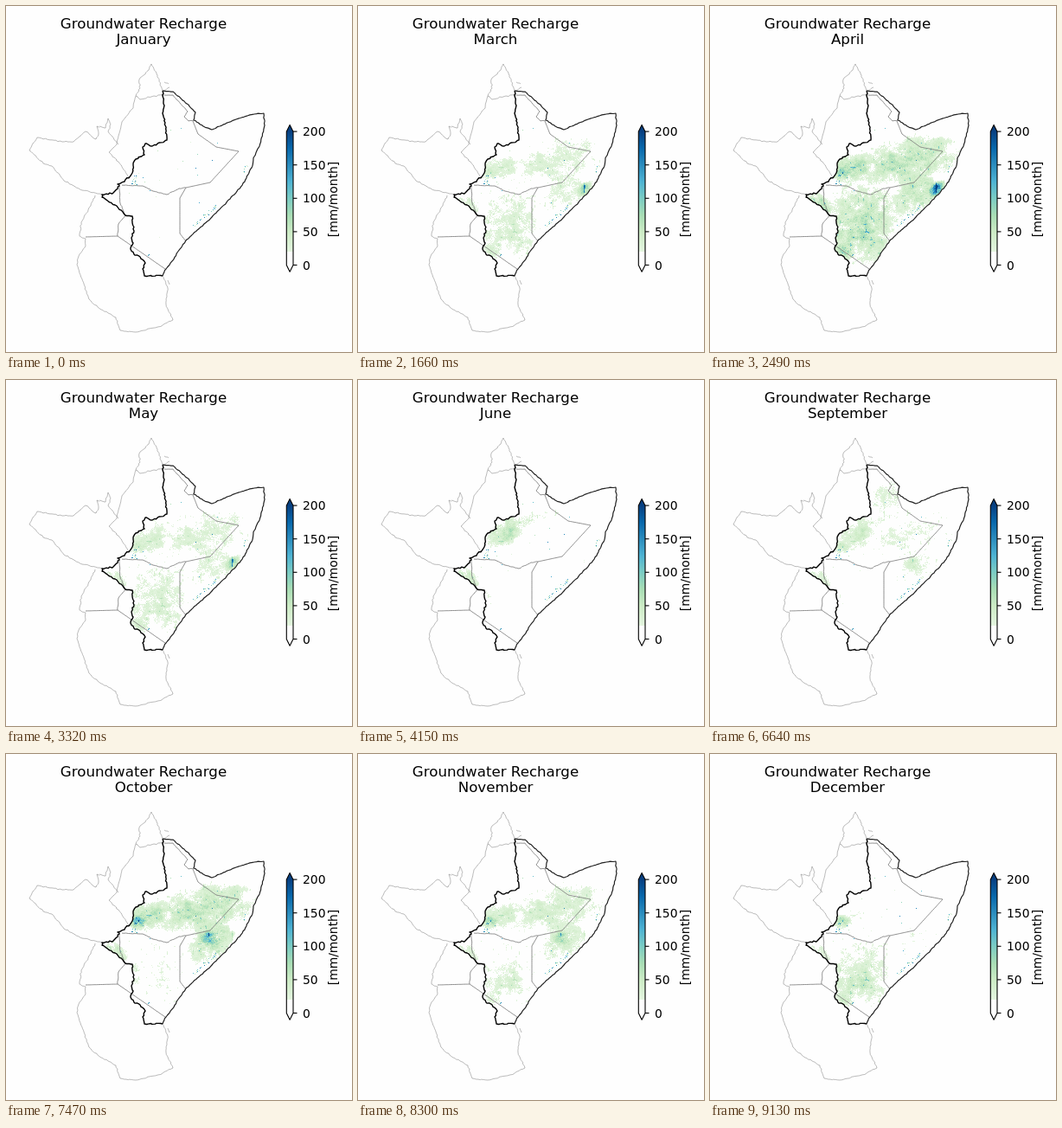
An HTML page with a canvas that plays this animation: 400x400 px, repeating every 9.96 s.

```html
<!DOCTYPE html>
<html lang="en">
<head>
<meta charset="utf-8">
<title>Groundwater Recharge</title>
<style>
html, body { margin: 0; width: 100%; height: 100%; overflow: hidden; background: #fefefe; }
canvas, svg { position: absolute; left: 0; top: 0; width: 400px; height: 400px; }
text { font-family: "DejaVu Sans", sans-serif; font-size: 13.89px; fill: #000; }
.title { font-size: 16.67px; text-anchor: middle; }
path { fill: none; stroke-linejoin: round; }
</style>
</head>
<body>
<canvas id="map" width="400" height="400"></canvas>
<svg viewBox="0 0 400 400">
  <defs><linearGradient id="scale" x1="0" y1="1" x2="0" y2="0"></linearGradient></defs>
  <g id="lines"></g>
  <text class="title" x="159" y="26">Groundwater Recharge</text>
  <text class="title" x="159" y="44" id="month">January</text>
  <rect x="324.3" y="145" width="7.7" height="154.5" fill="url(#scale)"/>
  <path d="M324.3 145.2L328.1 137.4L332 145.2Z" style="fill:#084081"/>
  <path d="M324.3 145.2L328.1 137.4L332 145.2V299.5L328.1 307.2L324.3 299.5Z" stroke="#000" stroke-width="1.1"/>
  <g id="ticks"></g>
  <text transform="translate(383 223.5) rotate(-90)" text-anchor="middle">[mm/month]</text>
</svg>
<script>
const $ = id => document.getElementById(id);
const STEP = 830;
const MONTHS = 'January February March April May June July August September October November December'.split(' ');
const RAMP = ['f7fcf0', 'e0f3db', 'ccebc5', 'a8ddb5', '7bccc4', '4eb3d3', '2b8cbe', '0868ac', '084081']
  .map(h => [0, 2, 4].map(i => parseInt(h.substr(i, 2), 16)));

// Each rainy season: the month of its peak (January = 0) and its width in months
const SEASONS = { spring: [3, 1.2], summer: [6.3, 2], late: [7, 1], autumn: [9.2, 1.2], winter: [10.7, .95] };

// Rain areas: centre, radii, tilt in degrees, strength per season
const AREAS = [
  [165, 187, 20, 14, 0, { spring: 46, summer: 18, autumn: 42, winter: 13 }],
  [153, 194, 9, 7, 0, { spring: 50, autumn: 75, winter: 48 }],
  [230, 178, 53, 23, -10, { spring: 46, autumn: 46 }],
  [171, 174, 20, 13, -30, { summer: 62 }],
  [203, 159, 27, 8, -14, { summer: 34 }],
  [203, 135, 18, 21, 10, { late: 62, spring: 8 }],
  [126, 229, 17, 9, 45, { spring: 52, summer: 56, autumn: 40, winter: 26 }],
  [150, 252, 7, 15, -10, { spring: 35, summer: 25, autumn: 22, winter: 26 }],
  [176, 250, 33, 42, 0, { spring: 48, autumn: 15, winter: 25 }],
  [170, 263, 23, 19, 0, { spring: 35, winter: 42 }],
  [156, 283, 11, 7, 30, { spring: 65, winter: 42 }],
  [237, 217, 26, 16, -40, { spring: 46, autumn: 46, winter: 14 }],
  [236, 213, 11, 8, 0, { autumn: 88 }],
  [261, 211, 10, 6, -45, { spring: 95 }]
];

// Places that stay wet all year: centre, radii, tilt, number of cells
const SPRINGS = [
  [148, 201, 3, 7, 0, 16], [230, 242, 18, 2, -42, 30],
  [276, 188, 1.5, 5, 30, 9], [165, 287, 1.5, 1.5, 0, 4], [190, 185, 55, 45, 0, 30]
];

function hash(x, y, s = 0) {
  let h = Math.imul(x, 374761393) + Math.imul(y, 668265263) + Math.imul(s, 974634777);
  h = Math.imul(h ^ (h >>> 13), 1274126177);
  return ((h ^ (h >>> 16)) >>> 0) / 4294967296;
}
let seed = 0;
const rnd = () => hash(++seed, 7, 3);

function noise(x, y, size) {
  x /= size; y /= size;
  const i = Math.floor(x), j = Math.floor(y), ease = t => t * t * (3 - 2 * t);
  const u = ease(x - i), v = ease(y - j), n = (a, b) => hash(i + a, j + b, size);
  return (n(0, 0) * (1 - u) + n(1, 0) * u) * (1 - v) + (n(0, 1) * (1 - u) + n(1, 1) * u) * v;
}

function turn(x, y, deg) {
  const a = deg * Math.PI / 180, c = Math.cos(a), s = Math.sin(a);
  return [x * c - y * s, x * s + y * c];
}

function color(v) {
  const t = Math.min(v / 200, 1) * 8, i = Math.min(7, Math.floor(t));
  return RAMP[i].map((c, k) => Math.round(c + (RAMP[i + 1][k] - c) * (t - i)));
}

// Turns "x,y x,y" into a path with small irregular bends
function jag(points, amp) {
  const p = points.split(' ').map(s => s.split(',').map(Number));
  let d = 'M' + p[0];
  for (let k = 1; k < p.length; k++) {
    const [x, y] = p[k - 1], dx = p[k][0] - x, dy = p[k][1] - y;
    const n = Math.ceil(Math.hypot(dx, dy) / 2.5);
    for (let i = 1; i <= n; i++) {
      const a = i < n ? amp : 0;
      d += `L${(x + dx * i / n + (rnd() - .5) * a).toFixed(1)} ${(y + dy * i / n + (rnd() - .5) * a).toFixed(1)}`;
    }
  }
  return d;
}
function stroke(d, color, width) {
  $('lines').innerHTML += `<path d="${d}" stroke="${color}" stroke-width="${width}"/>`;
}

const west = jag('181,312 160,312 158,304 161,297 155,290 148,287 144,281 147,274 145,268 148,260 146,243 138,242 126,230 111,221 111,218 124,216 131,208 129,206 137,203 146,193 147,184 150,177 160,172 158,163 161,159 169,162 186,155 184,135 181,124 183,115 181,98', 1.7);
const coast = jag('181,98 193,99 206,110 219,123 217,132 228,139 238,143 247,139 266,131 287,125 298,124 299,138 293,162 287,174 284,187 276,203 264,218 238,244 209,270 198,285 193,294 185,304 181,312', 1);

const neighbours = [
  '181,98 174,78 168,67 165,74 154,85 155,95 150,104 147,118 134,134 128,160 119,169 130,180 143,199',
  '150,104 155,108 171,104 183,103', '181,98 189,94',
  '111,218 88,213 67,202 53,185 43,182 27,167 36,152 65,157 78,157 92,145 104,154 107,148 105,139 115,141 118,130 121,137 118,145 130,160',
  '103,219 98,231 87,250 85,266 92,269 92,277 85,287 82,299 96,339 106,348 127,360 132,375 150,377 180,370 193,363 185,345 187,326 181,312',
  '187,317 189,322', '183,88 188,90'
];
const inner = [
  '183,103 193,103 210,122 206,128 211,133 217,132',
  '134,207 158,208 170,214 186,218 200,211 208,210',
  '131,208 132,228 138,242 130,252 129,266'
];
const straight = [
  '92,267 129,266 184,304',
  '216,133 222,148 243,163 269,168 236,204 208,210 201,222 201,263 208,272'
];
neighbours.forEach(p => stroke(jag(p, 1.4), '#777', .5));
inner.forEach(p => stroke(jag(p, .7), '#777', .8));
straight.forEach(p => stroke(jag(p, 0), '#777', .8));
stroke(west, '#000', 1.4);
stroke(coast, '#222', 1.2);

// Cells of the region, each with its own fixed texture
const ctx = $('map').getContext('2d');
const region = new Path2D(west + coast.replace('M', 'L') + 'Z'), cells = [];
for (let y = 96; y < 315; y++) for (let x = 108; x < 301; x++) {
  if (!ctx.isPointInPath(region, x + .5, y + .5)) continue;
  const n = .4 * noise(x, y, 11) + .35 * noise(x, y, 4) + .25 * hash(x, y, 1);
  const pool = noise(x, y, 3) > .87 ? 2 : 1;
  cells.push([x, y, Math.max(0, 2.3 * n - .15) * pool]);
}
const wet = {};
for (const [x, y, rx, ry, deg, n] of SPRINGS) for (let i = 0; i < n; i++) {
  const [dx, dy] = turn((rnd() * 2 - 1) * rx, (rnd() * 2 - 1) * ry, deg);
  wet[Math.round(x + dx) + ',' + Math.round(y + dy)] = 25 + 150 * rnd() ** 2;
}

function strength(rain, month) {
  return Math.max(...Object.keys(rain).map(k => {
    const [peak, width] = SEASONS[k], gap = Math.abs(month - peak);
    return rain[k] * Math.exp(-((Math.min(gap, 12 - gap) / width) ** 2));
  }));
}

function paint(month) {
  $('month').textContent = MONTHS[month];
  const img = ctx.createImageData(400, 400);
  const active = AREAS.map(([x, y, rx, ry, deg, rain]) => [x, y, rx, ry, deg, strength(rain, month)])
    .filter(a => a[5] > 3);
  for (const [x, y, n] of cells) {
    let sum = 0;
    for (const [cx, cy, rx, ry, deg, amp] of active) {
      const [u, v] = turn(x - cx, y - cy, -deg);
      const part = amp * Math.exp(-.7 * ((u / rx) ** 2 + (v / ry) ** 2) ** 1.6);
      sum = Math.max(sum, part) + Math.min(sum, part) * .25;
    }
    const v = Math.max(sum * n, wet[x + ',' + y] || 0);
    if (v >= 20) img.data.set([...color(v), 255], (y * 400 + x) * 4);
  }
  ctx.putImageData(img, 0, 0);
}

let stops = '<stop offset=".1" stop-color="#fff"/>';
for (let v = 20; v <= 200; v += 5) stops += `<stop offset="${v / 200}" stop-color="rgb(${color(v)})"/>`;
$('scale').innerHTML = stops;
for (let v = 0; v <= 200; v += 50) {
  const y = 299.5 - v * .772;
  $('ticks').innerHTML += `<path d="M332 ${y}h4.5" stroke="#000" stroke-width="1.1"/><text x="343" y="${Math.round(y + 5)}">${v}</text>`;
}

let shown = -1;
function frame(now) {
  const month = Math.floor(Math.max(0, now) / STEP) % 12;
  if (month !== shown) paint(shown = month);
  requestAnimationFrame(frame);
}
frame(performance.now());
</script>
</body>
</html>
```
